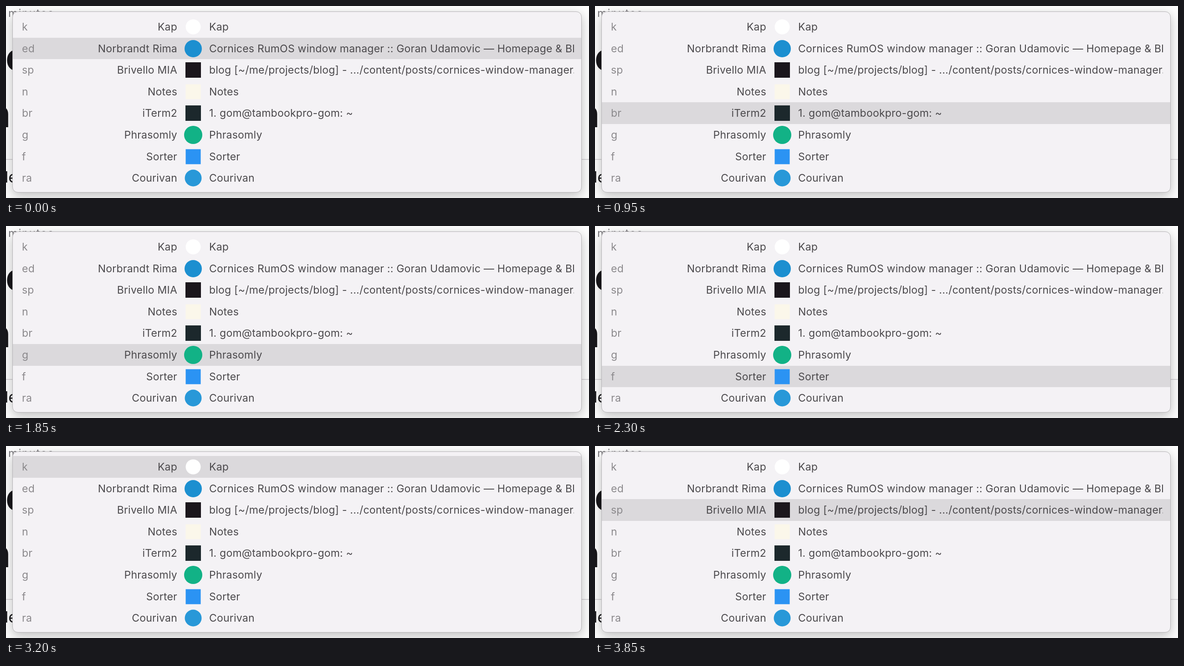
An HTML page that plays this animation: 1280x423 px, repeating every 3900 ms.

```html
<!DOCTYPE html>
<html lang="en">
<head>
<meta charset="utf-8">
<title>Window switcher</title>
<style>
  html, body { margin: 0; width: 1280px; height: 423px; overflow: hidden; background: #fdfdfd; }
  body { position: relative; font: 23px Inter, sans-serif; letter-spacing: .22px; color: #4b494c; }
  svg { position: absolute; left: 0; top: 0; }
  #panel {
    position: absolute; left: 14px; top: 12px; width: 1248px; height: 397px;
    border: 1px solid #b5b3b6; border-radius: 12px; background: #f4f2f5;
    box-shadow: 0 7px 24px rgba(0, 0, 0, .25);
  }
  .row { position: absolute; left: 0; width: 1248px; height: 47.6px; white-space: nowrap; }
  .row.on { background: #dbd9dc; }
  .row span { position: absolute; top: 1px; line-height: 47.6px; }
  .key { left: 20px; color: #8b898c; }
  .app { right: 887px; }
  .title { left: 431px; width: 801px; overflow: hidden; }
  .row i { position: absolute; left: 396px; top: 24px; transform: translate(-50%, -50%); }
</style>
</head>
<body>
<svg width="1280" height="423" font-family="Inter, sans-serif" letter-spacing="0" fill="#18171a">
  <text x="5" y="24" font-size="24" letter-spacing="1.6" fill="#77757a">minutes</text>
  <text x="-1" y="142" font-size="83" font-weight="700">o</text>
  <text x="10" y="267" font-size="84" font-weight="700" text-anchor="end">n</text>
  <path d="M0 338H1280" stroke="#cfcdd0" stroke-width="1.5"/>
  <text x="-3" y="389" font-size="34">le</text>
</svg>
<div id="panel"></div>
<script>
// key, application, window title, icon colour, icon size, round icon
const windows = [
  ['k', 'Kap', 'Kap', '#ffffff', 33, true],
  ['ed', 'Norbrandt Rima', 'Cornices RumOS window manager :: Goran Udamovic — Homepage & Blog about software', '#1c8fd0', 38, true],
  ['sp', 'Brivello MIA', 'blog [~/me/projects/blog] - .../content/posts/cornices-window-manager.md', '#1b161c', 34, false],
  ['n', 'Notes', 'Notes', '#fbf7ea', 33, false],
  ['br', 'iTerm2', '1. gom@tambookpro-gom: ~', '#1c282c', 34, false],
  ['g', 'Phrasomly', 'Phrasomly', '#12b286', 40, true],
  ['f', 'Sorter', 'Sorter', '#2b93f3', 33, false],
  ['ra', 'Courivan', 'Courivan', '#2898d8', 37, true],
];
const LOOP = 3900;
const moves = [100, 500, 900, 1400, 1900, 2350, 2800, 3250, 3700];
// 1850 ms already shows the fifth step
moves[4] = 1900;

const panel = document.getElementById('panel');

function addSpan(row, className, text) {
  const span = document.createElement('span');
  span.className = className;
  span.textContent = text;
  row.append(span);
}

const rows = windows.map(([key, app, title, color, size, round], i) => {
  const row = document.createElement('div');
  row.className = 'row';
  row.style.top = 9 + 47.6 * i + 'px';
  addSpan(row, 'key', key);
  addSpan(row, 'app', app);
  addSpan(row, 'title', title);
  const icon = document.createElement('i');
  icon.style.cssText = `width:${size}px;height:${size}px;background:${color};border-radius:${round ? '50%' : 0}`;
  row.append(icon);
  panel.append(row);
  return row;
});

function draw(now) {
  const time = now % LOOP;
  const selected = (1 + moves.filter(t => t <= time).length) % rows.length;
  rows.forEach((row, i) => row.classList.toggle('on', i === selected));
  requestAnimationFrame(draw);
}
draw(performance.now());
</script>
</body>
</html>
```
